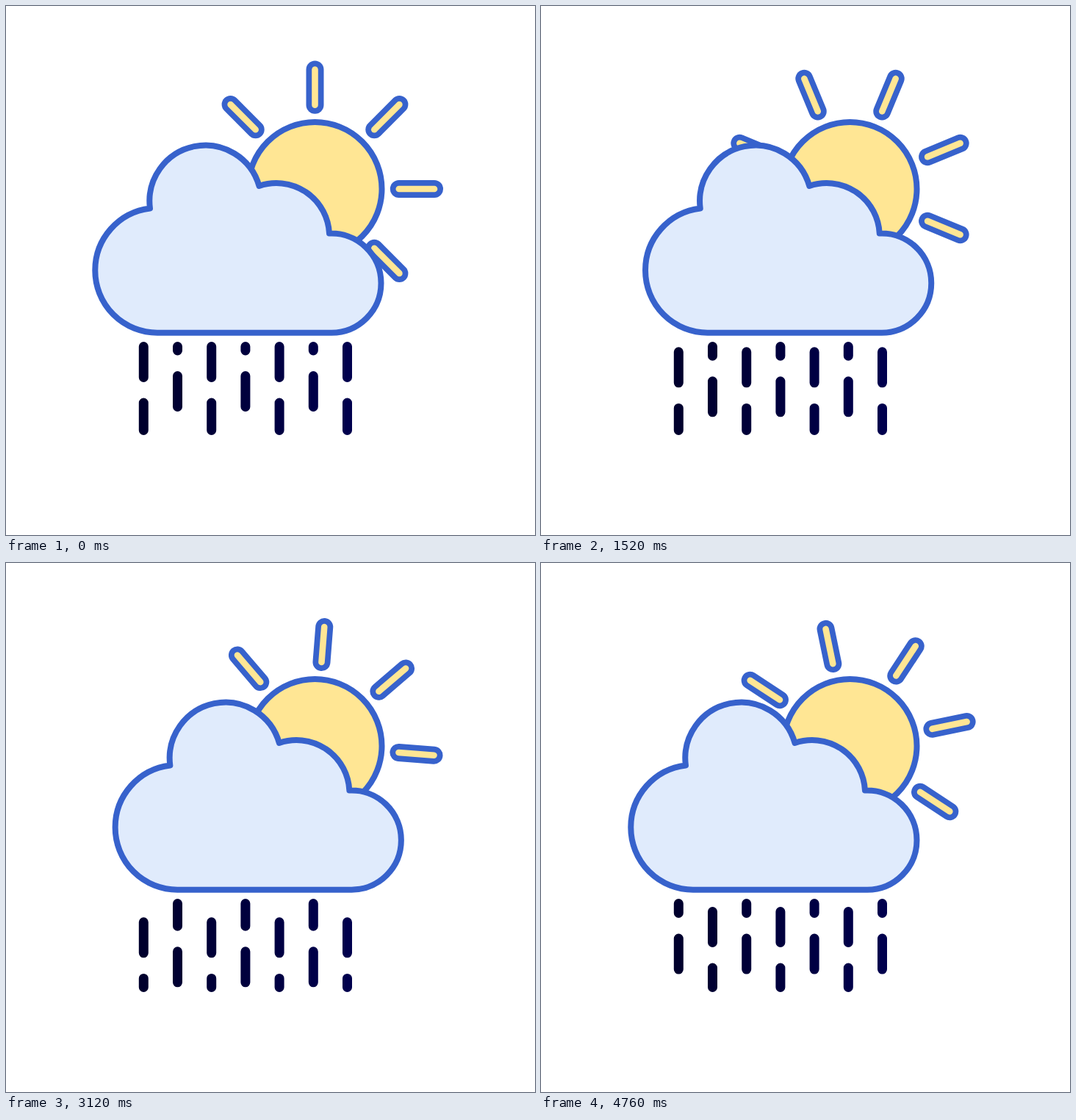
An HTML page that plays this animation: 720 px wide and 720 px high, repeating every 4800 ms.

```html
<!DOCTYPE html>
<html lang="en">
<head>
<meta charset="utf-8">
<title>Sun, cloud and rain</title>
<style>
  html, body { margin: 0; width: 100%; height: 100%; overflow: hidden; background: #fff; }
  svg { display: block; width: 100%; height: 100%; }
  .body { stroke: #3762cc; stroke-width: 8; stroke-linejoin: round; }
  .sun { fill: #ffe694; }
  .cloud { fill: #e0ebfc; }
  .ray { stroke-linecap: round; }
  .rim { stroke: #3762cc; stroke-width: 24; }
  .core { stroke: #ffe694; stroke-width: 8.6; }
  #rain { stroke: url(#navy); stroke-width: 13; stroke-linecap: round; stroke-dasharray: 42 34.6; }
</style>
</head>
<body>
<svg viewBox="0 0 720 720">
  <defs>
    <linearGradient id="navy" gradientUnits="userSpaceOnUse" x1="181" y1="0" x2="471" y2="0">
      <stop offset="0" stop-color="#00002c"/>
      <stop offset="1" stop-color="#00004e"/>
    </linearGradient>
  </defs>
  <g transform="translate(420.5 249)">
    <circle class="body sun" r="91"/>
    <g id="rays"></g>
  </g>
  <path id="cloud" class="body cloud" d="M206 444.7
    A84.7 84.7 0 0 1 121.3 360 A84.7 84.7 0 0 1 196 275.5
    A76 76 0 0 1 344.5 245
    A72 72 0 0 1 440 309.6
    A67.5 67.5 0 0 1 510.5 377 A67.5 67.5 0 0 1 443 444.7 Z"/>
  <g id="rain"></g>
</svg>
<script>
  const LOOP = 4800, STEP = 40, LAG = 20;
  const SWAY = 32, HALF = 2500;      // cloud travel in px, one way in ms
  const SPIN = 0.045;                // rays, degrees per ms
  const FALL = 0.107, PERIOD = 76.6; // rain, px per ms and dash period

  const $ = id => document.getElementById(id);

  function line(parent, attrs) {
    const el = document.createElementNS('http://www.w3.org/2000/svg', 'line');
    for (const key in attrs) el.setAttribute(key, attrs[key]);
    return parent.appendChild(el);
  }

  const rays = $('rays'), cloud = $('cloud');
  for (let a = 0; a < 360; a += 45) {
    for (const part of ['rim', 'core']) {
      line(rays, { class: 'ray ' + part, y1: -114.3, y2: -162.5, transform: `rotate(${a})` });
    }
  }

  const drops = [];
  for (let i = 0; i < 7; i++) {
    const x = 187.3 + i * 46.2;
    drops.push(line($('rain'), { x1: x, x2: x, y1: 463.5, y2: 577.5 }));
  }

  function draw(t) {
    const time = Math.max(0, t - LAG);

    const u = 1 - Math.abs(1 - time / HALF);
    const dx = SWAY * u * u * (3 - 2 * u);
    cloud.setAttribute('transform', `translate(${dx.toFixed(3)} 0)`);

    rays.setAttribute('transform', `rotate(${(time * SPIN).toFixed(3)})`);

    drops.forEach((drop, i) => {
      const shift = (time * FALL + (i % 2) * 40) % PERIOD;
      drop.setAttribute('stroke-dashoffset', (-shift).toFixed(3));
    });
  }

  function tick(now) {
    draw(Math.floor((now + 1) / STEP) * STEP % LOOP);
    requestAnimationFrame(tick);
  }

  draw(0);
  requestAnimationFrame(tick);
</script>
</body>
</html>
```
